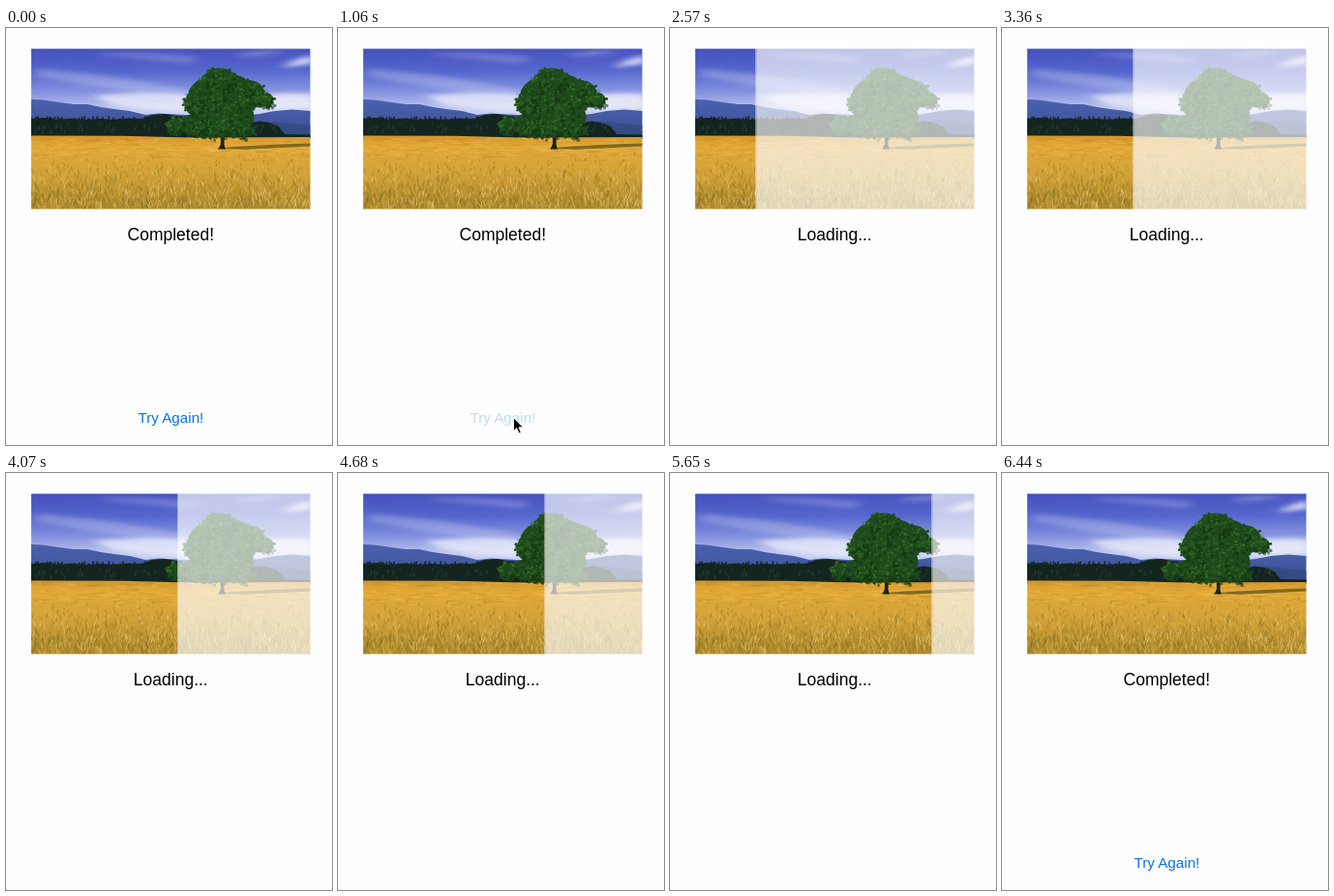
Recreate the animation shown at these times as an HTML page. Size 337 px wide and 432 px high, loop 7.76 s.

```html
<!DOCTYPE html>
<html lang="en">
<head>
<meta charset="utf-8">
<title>Loading reveal</title>
<style>
html, body { margin: 0; width: 100%; height: 100%; overflow: hidden; background: #fefefe; }
svg { display: block; width: 337px; height: 432px; }
text { font-family: "Liberation Sans", Arial, sans-serif; text-anchor: middle; }
.status { font-size: 17.5px; fill: #000; }
.retry { font-size: 15.2px; fill: #0a70e2; }

.done, .busy, .retry, .veil, .pointer { animation: 7760ms step-end infinite; }
.done { animation-name: done; }
.busy { animation-name: busy; }
.retry { animation-name: press; }
.veil { animation-name: reveal; }
.pointer { animation-name: point; }

@keyframes done {
  0%, 82.98% { visibility: visible; }
  14.81% { visibility: hidden; }
}
@keyframes busy {
  0%, 82.98% { visibility: hidden; }
  14.81% { visibility: visible; }
}
@keyframes press {
  0%, 14.81% { opacity: 1; }
  13.65% { opacity: .25; }
}
@keyframes reveal {
  0% { transform: none; }
  19.27% { transform: translateX(0); animation-timing-function: steps(56, end); }
  82.925%, 100% { transform: translateX(291.2px); }
}
@keyframes point {
  0% { visibility: hidden; transform: translate(262px, 425px); }
  5.79% { visibility: visible; transform: translate(262px, 425px); }
  6.95% { visibility: visible; transform: translate(240px, 418px); }
  7.98% { visibility: visible; transform: translate(216px, 411px); }
  9.14% { visibility: visible; transform: translate(198px, 406px); }
  10.3% { visibility: visible; transform: translate(186px, 404px); }
  11.46% { visibility: visible; transform: translate(181px, 403px); }
  17.13% { visibility: visible; transform: translate(190px, 404px); }
  18.29% { visibility: visible; transform: translate(226px, 406px); }
  19.32% { visibility: visible; transform: translate(297px, 402px); }
  20.48%, 100% { visibility: hidden; transform: translate(297px, 402px); }
}
</style>
</head>
<body>
<svg viewBox="0 0 337 432">
  <defs>
    <clipPath id="frame"><rect x="26.1" y="21.5" width="288.4" height="166"/></clipPath>
    <linearGradient id="sky" x1="0" y1="0" x2=".05" y2="1">
      <stop offset="0" stop-color="#4650bd"/>
      <stop offset=".35" stop-color="#5566cd"/>
      <stop offset=".65" stop-color="#8795e0"/>
      <stop offset=".9" stop-color="#c3caf0"/>
    </linearGradient>
    <linearGradient id="hills" x1="0" y1="0" x2="0" y2="1">
      <stop offset="0" stop-color="#4b60ae"/>
      <stop offset="1" stop-color="#3a5090"/>
    </linearGradient>
    <linearGradient id="field" x1="0" y1="0" x2="0" y2="1">
      <stop offset="0" stop-color="#d1952b"/>
      <stop offset=".15" stop-color="#e2a938"/>
      <stop offset=".5" stop-color="#d2a238"/>
      <stop offset="1" stop-color="#ab872e"/>
    </linearGradient>
    <filter id="soft" x="-20%" y="-60%" width="140%" height="220%"><feGaussianBlur stdDeviation="6 2"/></filter>
    <filter id="blend"><feGaussianBlur stdDeviation=".55"/></filter>
  </defs>

  <g clip-path="url(#frame)">
    <rect x="26" y="21" width="289" height="72" fill="url(#sky)"/>
    <g fill="#f3f4fc" filter="url(#soft)">
      <path d="M30 42 Q90 46 150 57 T215 70 L200 76 Q120 66 30 50Z" opacity=".25"/>
      <path d="M90 27 Q140 23 200 30 L188 37 Q140 32 90 27Z" opacity=".2"/>
      <path d="M90 70 Q145 65 192 70 L190 87 Q150 86 110 80Z" opacity=".7"/>
      <path d="M262 70 Q290 66 320 69 L320 84 Q290 83 262 86Z" opacity=".75"/>
      <path d="M284 41 Q300 31 318 28 L318 37 Q300 39 284 41Z" opacity=".8"/>
      <path d="M236 28 Q262 22 290 24 Q260 31 236 28Z" opacity=".3"/>
    </g>
    <path fill="url(#hills)" d="M26 74 L38 74.5 L55 77 L70 79 L84 79 L98 82 L112 84 L128 86 L144 90 L158 88.5 L185 90 L230 93 L262 89 L278 86 L296 84.5 L315 86 V114 H26Z"/>
    <path fill="#32487f" d="M255 99 L276 97 L315 101 V114 H255Z" opacity=".7"/>
    <path fill="#14251f" d="M26 94 L40 93 L54 95 L68 93.5 L82 95 L98 94 L112 95 L126 93.5 L140 94 L151 90 L164 89 L176 91 L190 92 L220 98 L250 99 L262 96.5 L272 98 L282 102 L288 110 L315 110.5 V115 H26Z"/>
    <g id="woods" filter="url(#blend)"></g>
    <path fill="url(#field)" d="M26 111.5 L120 111.8 L190 113.5 L315 113 V188 H26Z"/>
    <g id="grass" filter="url(#blend)"></g>
    <path fill="#6a5a1a" d="M216 125 Q245 121.5 315 119.5 V122.5 Q280 124.5 246 125.8Z" opacity=".8" filter="url(#blend)"/>
    <path fill="#1b230e" d="M221.2 96 L226 96 L225.5 121 L227 125.5 L219.5 125.5 L222 120Z"/>
    <g id="tree" filter="url(#blend)"></g>
    <g class="busy"><rect class="veil" x="26.4" y="21" width="292" height="168" fill="#fefefe" opacity=".67"/></g>
  </g>

  <g class="done">
    <text class="status" x="170.3" y="219.8">Completed!</text>
    <text class="retry" x="170.4" y="408.6">Try Again!</text>
  </g>
  <text class="status busy" x="170.3" y="219.8">Loading...</text>
  <path class="pointer" d="M.5 .7V14.6L3.7 11.6L6 17L8.3 16L6 10.8H10.4Z" fill="#000" stroke="#fff" stroke-width=".9"/>
</svg>
<script>
let seed = 41;
const rand = (lo = 0, hi = 1) => {
  seed = (seed * 16807) % 2147483647;
  return lo + (hi - lo) * seed / 2147483647;
};

function draw(id, tag, attrs) {
  const node = document.createElementNS("http://www.w3.org/2000/svg", tag);
  for (const key in attrs) node.setAttribute(key, attrs[key]);
  document.getElementById(id).append(node);
}

// Adds one path made of many randomly placed marks.
function marks(id, count, color, width, opacity, mark) {
  const d = Array.from({ length: count }, mark).join("");
  draw(id, "path", { d, fill: "none", stroke: color, "stroke-width": width, "stroke-linecap": "round", opacity });
}
const line = (x, y, dx, dy) =>
  `M${x.toFixed(1)} ${y.toFixed(1)}l${dx.toFixed(1)} ${dy.toFixed(1)}`;

// Woods: ragged tops and paler trunks
marks("woods", 75, "#14251f", 1.8, .9, () => line(rand(26, 190), rand(92, 96), 0, 5));
marks("woods", 70, "#2b4638", 1.3, .6, () => line(rand(28, 285), rand(99, 107), 0, rand(1, 3)));

// Far field in thin rows, near field in loose blades
const row = () => line(rand(22, 310), rand(114, 138), rand(4, 16), rand(-.4, .4));
marks("grass", 120, "#f0bf57", .8, .5, row);
marks("grass", 90, "#ba8023", .8, .4, row);

const blade = () => {
  const y = 130 + 60 * Math.sqrt(rand());
  const len = 1.5 + (y - 125) / 11;
  return line(rand(26, 315), y, rand(-.5, .5) * len, -len * rand(.6, 1.2));
};
marks("grass", 420, "#98751f", 1, .45, blade);
marks("grass", 380, "#e6bd55", .9, .5, blade);
marks("grass", 240, "#776c20", 1, .45, blade);
marks("grass", 150, "#f0d88f", .8, .6, blade);

// Crown of the tree: x, y, rx, ry
const crown = [
  [221, 54, 19, 14], [208, 70, 21, 19], [235, 68, 22, 21], [253, 69, 16, 16],
  [267, 74, 11, 9], [196, 79, 13, 13], [215, 89, 23, 19], [240, 92, 18, 18],
  [197, 100, 18, 13], [177, 102, 11, 10], [211, 106, 23, 9], [238, 105, 21, 10]
];
for (const [cx, cy, rx, ry] of crown)
  draw("tree", "ellipse", { cx, cy, rx: rx - 1.5, ry: ry - 1.5, fill: "#1f4a1c" });

const leaf = (reach, dx = 0, dy = 0) => () => {
  const [x, y, rx, ry] = crown[Math.floor(rand(0, crown.length))];
  const a = rand(0, 2 * Math.PI), r = Math.sqrt(rand()) * reach;
  return line(x + dx + rx * r * Math.cos(a), y + dy + ry * r * Math.sin(a), rand(-1.5, 1.5), rand(-1, 1));
};
marks("tree", 600, "#1f4a1c", 2.6, 1, leaf(1));
marks("tree", 190, "#12310f", 2.8, .6, leaf(.8, 3, 4));
marks("tree", 190, "#336d24", 2, .6, leaf(.85, -2, -3));
marks("tree", 70, "#4a8a30", 1.5, .55, leaf(.75, -3, -4));
</script>
</body>
</html>
```
